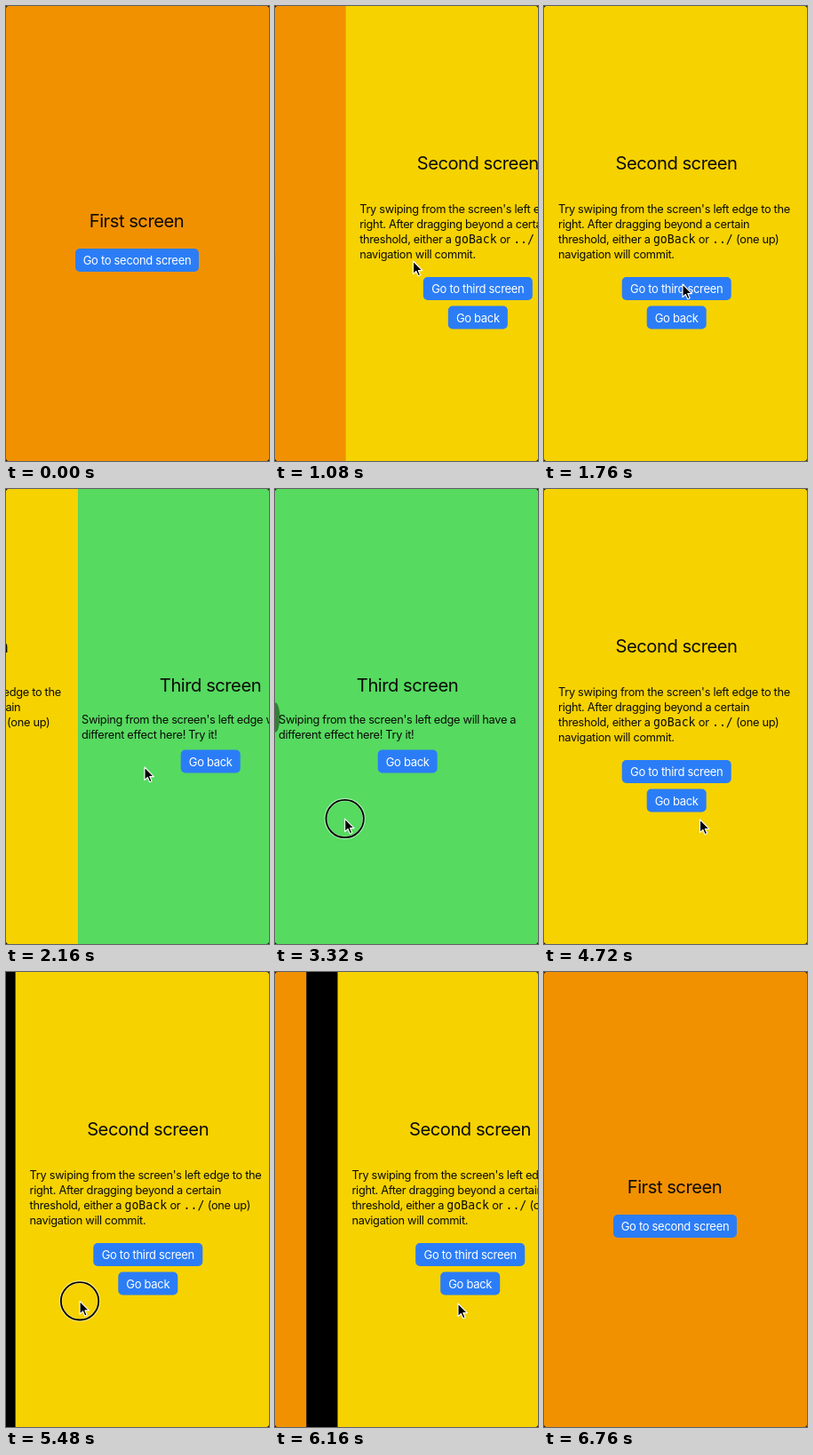
Recreate the animation shown at these times as an HTML page. Size 296 px wide and 512 px high, loop 7.04 s.

```html
<!DOCTYPE html>
<html lang="en">
<head>
<meta charset="utf-8">
<title>Screen navigation</title>
<style>
  html, body { margin: 0; width: 100%; height: 100%; overflow: hidden; background: #000; }
  svg { display: block; border-radius: 3px; }
  text { font: 12.8px Inter, "Liberation Sans", sans-serif; letter-spacing: -.024em; fill: #0c0c08; white-space: pre; }
  .title { font-size: 20.2px; }
  .title, .label { text-anchor: middle; }
  .label { font-size: 13px; fill: #fff; }
  .code { font: 13.2px "DejaVu Sans Mono", monospace; letter-spacing: 0; }
  .button { fill: #2b7df7; }
</style>
</head>
<body>
<svg id="stage" width="296" height="512" viewBox="0 0 296 512">
  <rect width="296" height="512"/>
  <g id="first"></g>
  <g id="second"></g>
  <g id="third"></g>
  <g id="pointer">
    <g id="ring" fill="none">
      <circle r="21.5" stroke="#fff" stroke-opacity=".5" stroke-width="3.4"/>
      <circle r="21.2" stroke="#000" stroke-width="1.8"/>
    </g>
    <path d="M0 0V14.6L3.4 11.5 5.7 16.8 8.1 15.7 5.8 10.6H10.4Z" stroke="#fff" stroke-width="1.1" stroke-linejoin="round"/>
  </g>
</svg>
<script>
const W = 296, LOOP = 7040, STEP = 40, SLIDE = 400;
const $ = id => document.getElementById(id);

const text = (cls, x, y, s) => `<text class="${cls}" x="${x}" y="${y}">${s}</text>`;
const code = s => `<tspan class="code">${s}</tspan>`;
const button = (cx, y, w, s) =>
  `<rect class="button" x="${cx - w / 2}" y="${y}" width="${w}" height="26" rx="5"/>` +
  text('label', cx, y + 18, s);
const lines = (x, y, list) => list.map((s, i) => text('body', x, y + 17 * i, s)).join('');

function screen(id, color, content) {
  $(id).innerHTML = `<rect width="${W}" height="512" fill="${color}"/>` + content;
}

screen('first', '#f29100',
  text('title', 147, 249, 'First screen') +
  button(147.5, 273, 139, 'Go to second screen'));

screen('second', '#f6d200',
  text('title', 149, 184, 'Second screen') +
  lines(16, 233, [
    "Try swiping from the screen's left edge to the",
    'right. After dragging beyond a certain',
    `threshold, either a ${code('goBack')} or ${code('../')} (one up)`,
    'navigation will commit.'
  ]) +
  button(149.2, 305, 123, 'Go to third screen') +
  button(149.2, 337.5, 67, 'Go back'));

screen('third', '#56da60',
  text('title', 149, 228, 'Third screen') +
  lines(4, 264, [
    "Swiping from the screen's left edge will have a",
    'different effect here! Try it!'
  ]) +
  button(149.2, 293.5, 67, 'Go back') +
  '<path id="bulge" fill-opacity=".42"/>' +
  '<path id="chevron" fill="none" stroke="#fff" stroke-width="1.6"/>');

// Each press lasts from down to up; its slide starts on release.
const press = (up, hold) => ({ up, down: up - hold });
const toSecond = press(905, 100), toThird = press(1987, 100);
const back = press(3897, 780), home = press(6114, 1110);
const presses = [toSecond, toThird, back, home];

// The cursor rests at x, y and glides between rests.
const rest = (from, to, x, y) => ({ from, to, x, y });
const rests = [
  rest(40, 40, 275, 327),
  rest(640, 1400, 155.5, 287),
  rest(1760, 2560, 156, 313),
  rest(3080, 3160, 8, 370),
  rest(3640, 4360, 286, 374),
  rest(5160, 5160, 25, 369),
  rest(6000, 6400, 206, 373),
  rest(6760, 6760, -12, 344)
];

const clamp = v => Math.min(1, Math.max(0, v));

function bezier(x1, y1, x2, y2) {
  const at = (a, b, u) => 3 * a * u * (1 - u) ** 2 + 3 * b * u * u * (1 - u) + u ** 3;
  return x => {
    if (x <= 0 || x >= 1) return clamp(x);
    let lo = 0, hi = 1;
    for (let i = 0; i < 24; i++) {
      const mid = (lo + hi) / 2;
      if (at(x1, x2, mid) < x) lo = mid; else hi = mid;
    }
    return at(y1, y2, lo);
  };
}
const ease = bezier(.25, .1, .25, 1);
const smooth = bezier(.35, 0, .65, 1);

function cursor(t) {
  const i = Math.max(1, rests.findIndex(r => r.from > t));
  const a = rests[i - 1], b = rests[i];
  const k = smooth((t - a.to) / (b.from - a.to));
  return { x: a.x + (b.x - a.x) * k, y: a.y + (b.y - a.y) * k };
}

const since = (p, t) => clamp((t - p.up) / SLIDE);
const slide = (p, t) => ease(since(p, t));
// How far the finger has moved during a press; kept after release.
const reach = (p, t) => t < p.down ? 0 : Math.max(0, cursor(Math.min(t, p.up)).x - 30);

const move = (id, x, y = 0) => $(id).setAttribute('transform', `translate(${x} ${y})`);
const show = (id, on) => $(id).setAttribute('visibility', on ? 'visible' : 'hidden');

function draw(t) {
  const out = slide(toSecond, t), next = slide(toThird, t);
  const prev = slide(back, t), end = slide(home, t);
  move('first', W * (end - out));
  move('second', W * (1 - out - next + prev + end) + .2 * reach(home, t));
  move('third', W * (1 - next + prev));

  const size = clamp(reach(back, t) / 220) * (1 - since(back, t));
  const rx = 25 * size, ry = 76 * size;
  $('bulge').setAttribute('d', `M0 ${257 - ry}A${rx} ${ry} 0 0 1 0 ${257 + ry}Z`);
  $('chevron').setAttribute('d', `M${rx - 14} 253l3.5 4l-3.5 4`);
  show('bulge', size > 0);
  show('chevron', size > .5);

  const { x, y } = cursor(t);
  const visible = t >= rests[0].from && t < rests[rests.length - 1].to;
  move('pointer', x, y);
  show('pointer', visible);
  show('ring', visible && presses.some(p => t >= p.down && t < p.up));
}

const begin = performance.now();
function tick() {
  const t = (performance.now() - begin) % LOOP;
  draw(Math.floor(t / STEP) * STEP);
  requestAnimationFrame(tick);
}
draw(0);
tick();
</script>
</body>
</html>
```
